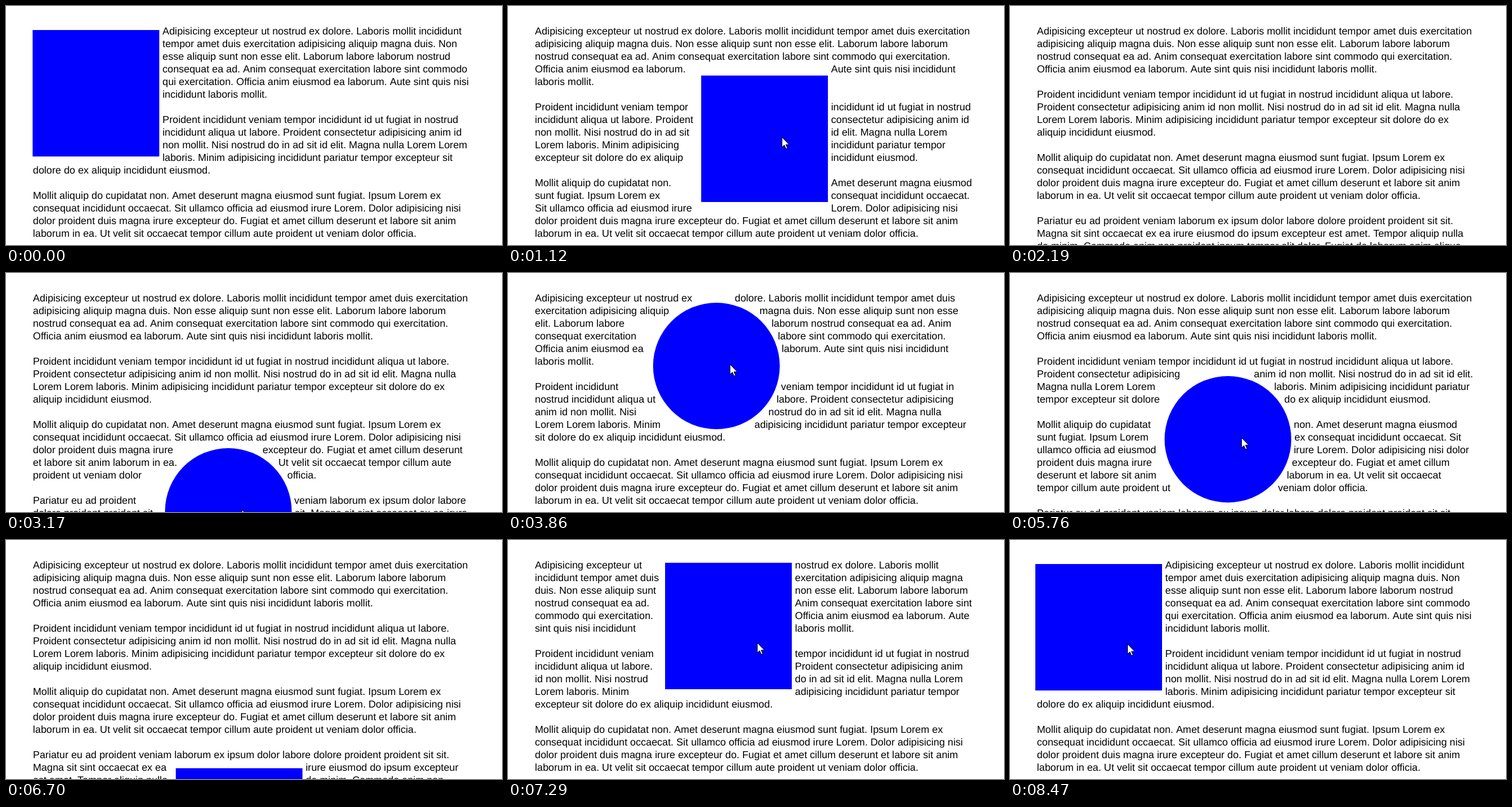
An HTML page with a canvas for the animation above (8.55 s loop, 783 px wide and 378 px high).

```html
<!DOCTYPE html>
<html lang="la">
<head>
<meta charset="utf-8">
<title>Text flowing around a dragged shape</title>
<style>
  html, body { margin: 0; width: 100%; height: 100%; overflow: hidden; background: #fff; }
  canvas { display: block; }
</style>
</head>
<body>
<canvas id="stage" width="783" height="378"></canvas>
<script>
const canvas = document.getElementById('stage');
const ctx = canvas.getContext('2d');
const LOOP = 8550, STEP = 46.67;
const LEFT = 42.5, RIGHT = 733.1, TOP = 30, LINE = 20;
const RADIUS = 100, GAP = 5;

ctx.font = '16px "Liberation Sans", Arial, sans-serif';
ctx.textRendering = 'geometricPrecision';
const widthOf = text => ctx.measureText(text).width;
const SPACE = widthOf(' ');

const paragraphs = [
  `Adipisicing excepteur ut nostrud ex dolore. Laboris mollit incididunt tempor amet duis
   exercitation adipisicing aliquip magna duis. Non esse aliquip sunt non esse elit. Laborum
   labore laborum nostrud consequat ea ad. Anim consequat exercitation labore sint commodo
   qui exercitation. Officia anim eiusmod ea laborum. Aute sint quis nisi incididunt laboris mollit.`,
  `Proident incididunt veniam tempor incididunt id ut fugiat in nostrud incididunt aliqua ut
   labore. Proident consectetur adipisicing anim id non mollit. Nisi nostrud do in ad sit id
   elit. Magna nulla Lorem Lorem laboris. Minim adipisicing incididunt pariatur tempor
   excepteur sit dolore do ex aliquip incididunt eiusmod.`,
  `Mollit aliquip do cupidatat non. Amet deserunt magna eiusmod sunt fugiat. Ipsum Lorem ex
   consequat incididunt occaecat. Sit ullamco officia ad eiusmod irure Lorem. Dolor adipisicing
   nisi dolor proident duis magna irure excepteur do. Fugiat et amet cillum deserunt et labore
   sit anim laborum in ea. Ut velit sit occaecat tempor cillum aute proident ut veniam dolor officia.`,
  `Pariatur eu ad proident veniam laborum ex ipsum dolor labore dolore proident proident sit
   sit. Magna sit sint occaecat ex ea irure eiusmod do ipsum excepteur est amet. Tempor aliquip
   nulla do minim. Commodo anim non proident ipsum tempor elit dolor. Fugiat do laborum anim aliqua`
].map(text => text.split(/\s+/).map(word => ({ word, width: widthOf(word) })));

// Each drag eases through a few stops; grab is the pointer's place on the shape.
const drags = [
  { grab: { x: 127, y: 97 }, stops: [
    { t: 520, x: 42, y: 38 }, { t: 1120, x: 305, y: 110 }, { t: 2190, x: 290, y: 392 }] },
  { round: true, grab: { x: 121, y: 97 }, stops: [
    { t: 2790, x: 260, y: 366 }, { t: 3860, x: 229, y: 47 }, { t: 5100, x: 290, y: 50 },
    { t: 5760, x: 244, y: 163 }, { t: 6090, x: 250, y: 392 }] },
  { grab: { x: 145, y: 126 }, stops: [
    { t: 6650, x: 268, y: 366 }, { t: 7290, x: 248, y: 36 }, { t: 8470, x: 40, y: 38 }] }
];
const approach = { from: 40, to: 370, dx: 344, dy: 221 };

const clamp01 = u => Math.max(0, Math.min(1, u));
const smooth = u => u * u * (3 - 2 * u);
const mix = (a, b, u) => Math.round(a + (b - a) * u);

function positionAt(stops, now) {
  const next = stops.findIndex(stop => stop.t > now);
  if (next < 0) return stops.at(-1);
  if (next === 0) return stops[0];
  const a = stops[next - 1], b = stops[next];
  const elapsed = Math.floor((now - a.t) / STEP) * STEP;
  const u = smooth(elapsed / (b.t - a.t));
  return { x: mix(a.x, b.x, u), y: mix(a.y, b.y, u) };
}

// Free stretches of the line whose top is at y.
function lineSegments(y, shape) {
  const cx = shape.x + RADIUS, cy = shape.y + RADIUS;
  const dy = Math.max(y, Math.min(cy, y + LINE)) - cy;
  if (Math.abs(dy) > RADIUS) return [[LEFT, RIGHT]];
  const half = GAP + (shape.round ? Math.sqrt(RADIUS ** 2 - dy ** 2) : RADIUS);
  return [[LEFT, cx - half - 0.6], [Math.max(LEFT, Math.floor(cx + half)), RIGHT]];
}

function drawText(shape) {
  ctx.fillStyle = '#000';
  let y = TOP;
  for (const words of paragraphs) {
    for (let next = 0; next < words.length && y < canvas.height; y += LINE) {
      for (let [x, end] of lineSegments(y, shape)) {
        while (next < words.length && x + words[next].width <= end) {
          const { word, width } = words[next++];
          ctx.fillText(word, x, y + 15);
          x += width + SPACE;
        }
      }
    }
    y += LINE;
  }
}

function drawShape({ x, y, round }) {
  ctx.fillStyle = '#00f';
  ctx.beginPath();
  if (round) ctx.arc(x + RADIUS, y + RADIUS, RADIUS, 0, 2 * Math.PI);
  else ctx.rect(x, y, 2 * RADIUS, 2 * RADIUS);
  ctx.fill();
}

const arrow = new Path2D('M.5 .5V16.5L4.2 13L6.8 19L9.3 18L6.7 12.2H11.8Z');

function drawPointer(x, y) {
  ctx.save();
  ctx.translate(x, y);
  ctx.fillStyle = '#fff';
  ctx.strokeStyle = '#000';
  ctx.fill(arrow);
  ctx.stroke(arrow);
  ctx.restore();
}

function render() {
  const now = performance.now() % LOOP;
  const drag = drags.findLast(({ stops }) => stops[0].t <= now) ?? drags[0];
  const { x, y } = positionAt(drag.stops, now);
  const shape = { x, y, round: drag.round };
  ctx.fillStyle = '#fff';
  ctx.fillRect(0, 0, canvas.width, canvas.height);
  drawText(shape);
  drawShape(shape);
  if (now >= approach.from) {
    const left = 1 - smooth(clamp01((now - approach.from) / (approach.to - approach.from)));
    drawPointer(x + drag.grab.x + Math.round(approach.dx * left),
                y + drag.grab.y + Math.round(approach.dy * left));
  }
  requestAnimationFrame(render);
}
render();
</script>
</body>
</html>
```
